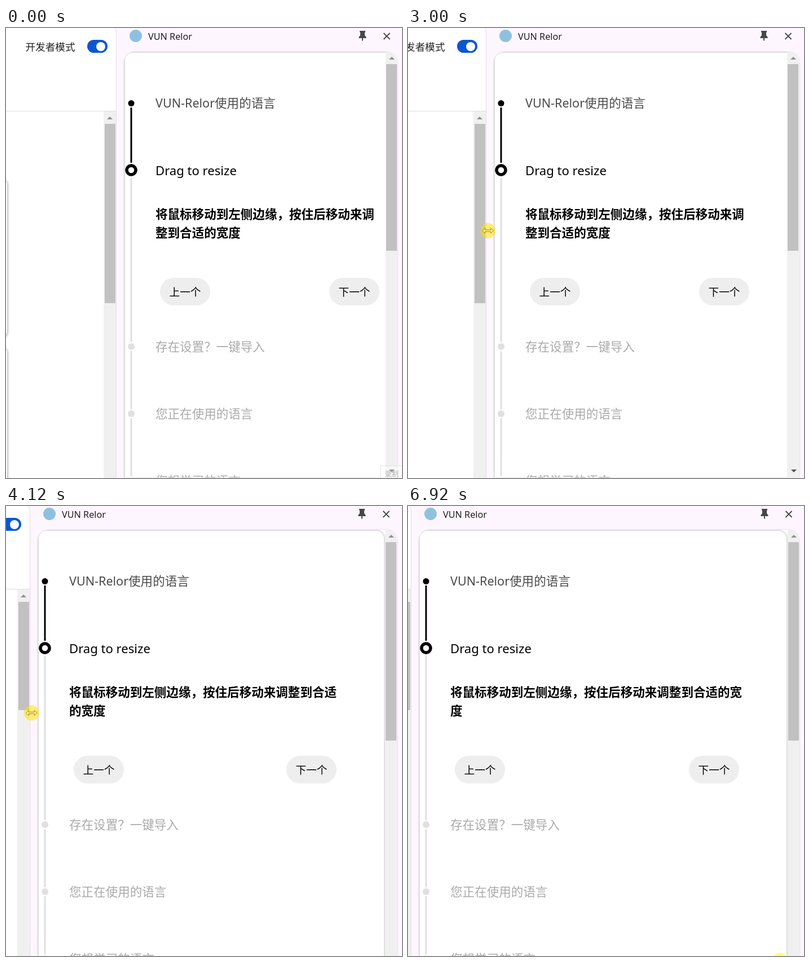
Write an HTML page that moves like this. It is 702 by 798 pixels and loops after 7.05 s.

```html
<!DOCTYPE html>
<html lang="zh-CN">
<head>
<meta charset="utf-8">
<title>Drag to resize</title>
<style>
  html, body { margin: 0; width: 100%; height: 100%; overflow: hidden; }
  body { font-family: "Noto Sans", "Noto Sans CJK SC", sans-serif; }
  #stage {
    --x: 0px; --r: 0px;
    position: relative; width: 702px; height: 798px; overflow: hidden;
    background: #fdf6fe; white-space: nowrap;
  }
  #stage div, #stage svg { position: absolute; box-sizing: border-box; }

  /* browser page on the left */
  .page {
    left: -300px; top: -3px; width: calc(496px + var(--x)); height: 810px;
    background: #fff; border-right: 1px solid #e4dde6;
    border-top-right-radius: 11px; overflow: hidden;
  }
  .mode { right: 72.5px; top: 24px; font-size: 17.6px; line-height: 24px; color: #1f1f1f; }
  .toggle { right: 15px; top: 24px; width: 36px; height: 23px; border-radius: 12px; background: #0b57d0; }
  .toggle::after {
    content: ""; position: absolute; right: 4px; top: 3.5px;
    width: 16px; height: 16px; border-radius: 50%; background: #fff;
  }
  .rule { left: 0; right: 0; top: 150px; height: 1px; background: #dcdcdc; }
  .tile {
    width: 200px; left: calc(102px + var(--x) / 4);
    border-radius: 8px; background: #fff; box-shadow: 0 1px 5px rgba(0, 0, 0, .55);
  }

  .track { background: #f0f0f0; }
  .thumb { background: #c1c1c1; width: 19px; }
  .up, .down { width: 10px; height: 5px; background: #8f8f8f; clip-path: polygon(50% 0, 100% 100%, 0 100%); }
  .down { background: #505050; clip-path: polygon(0 0, 100% 0, 50% 100%); }

  /* side panel */
  .icon { left: calc(219px + var(--x)); top: 3px; width: 22px; height: 22px; border-radius: 50%; background: #8fc1de; }
  .name { left: calc(252px + var(--x)); top: 3px; font-size: 16.2px; line-height: 24px; color: #1f1f1f; }
  .tools { left: var(--r); top: 0; }
  .panel {
    left: calc(209px + var(--x)); right: 8px; top: 42px; height: 770px;
    background: #fff; border-radius: 20px; overflow: hidden;
    box-shadow: 0 0 0 1px #ebe4ed;
  }
  .card {
    left: 2px; top: 2px; height: 800px;
    width: max(535px, calc(460px + var(--r) - var(--x)));
    border-radius: 14px; background: #fff; box-shadow: 0 0 2px 2px #d9d9d9;
  }
  .steps { left: 0; top: 0; }
  .label { left: 56px; font-size: 21.56px; line-height: 32px; color: #aaa; }
  .tip {
    left: 56px; top: 271px; width: max(404px, calc(329px + var(--r) - var(--x)));
    font-size: 21.56px; font-weight: 700; line-height: 33px; color: #000;
    white-space: normal; word-break: break-all;
  }
  .btn {
    left: 64px; top: 401px; width: 89px; height: 49px; border-radius: 25px;
    background: #eee; font-size: 18.7px; line-height: 49px; text-align: center; color: #000;
  }
  .next { left: max(364px, calc(289px + var(--r) - var(--x))); }
  .panel .track { right: 0; top: 0; width: calc(21px - var(--r)); height: 100%; }
  .panel .thumb { right: calc(1px - var(--r)); top: 22px; height: 331px; }
  .panel .up { right: calc(5px - var(--r)); top: 9px; }
  .panel .down { right: 5px; top: 741px; }
  .hbar { left: 0; right: 0; top: 755px; height: 30px; background: #e9e9e9; }
  .wide .panel .thumb { height: 352px; }
  .wide .down, .wide .hbar { display: none; }

  .rec {
    left: 663px; top: 776px; width: 45px; height: 30px; border: 1px solid #e6e3e6;
    background: rgba(255, 255, 255, .4); color: #b4b4b4;
    font-size: 12.6px; line-height: 28px; padding-left: 7px;
  }
  #cursor { left: 0; top: 0; overflow: visible; }
</style>
</head>
<body>
<div id="stage">
  <div class="page">
    <div class="tile" style="top:272px;height:278px"></div>
    <div class="tile" style="top:570px;height:290px"></div>
    <div class="mode">开发者模式</div>
    <div class="toggle"></div>
    <div class="rule"></div>
    <div class="track" style="right:0;top:151px;width:22px;height:660px"></div>
    <div class="up" style="right:6px;top:160px"></div>
    <div class="thumb" id="pageThumb" style="right:1px;top:173px"></div>
  </div>

  <div class="icon"></div>
  <div class="name">VUN Relor</div>
  <svg class="tools" width="702" height="30">
    <path d="M627 5h10v2l-1 1v5l2.500 3v2h-5.500v4l-1 1-1-1v-4h-5.500v-2l2.500-3v-5l-1-1z" fill="#474747"/>
    <path d="M669.500 9l11 11m0-11l-11 11" stroke="#474747" stroke-width="1.800"/>
  </svg>

  <div class="panel">
    <div class="card"></div>
    <svg class="steps" width="40" height="770" viewBox="0 42 40 770">
      <g stroke-width="3">
        <path d="M13 141V239" stroke="#000"/>
        <path d="M13 266V557M13 573V676M13 692V795" stroke="#e0e0e0"/>
      </g>
      <circle cx="13" cy="133.500" r="5.500"/>
      <circle cx="13" cy="252" r="8" fill="#fff" stroke="#000" stroke-width="5.500"/>
      <g fill="#e0e0e0">
        <circle cx="13" cy="565" r="6"/>
        <circle cx="13" cy="684" r="6"/>
        <circle cx="13" cy="803" r="6"/>
      </g>
    </svg>
    <div class="label" style="top:75px;color:#4a4a4a">VUN-Relor使用的语言</div>
    <div class="label" style="top:194px;color:#000;font-size:22.1px">Drag to resize</div>
    <div class="tip">将鼠标移动到左侧边缘，按住后移动来调整到合适的宽度</div>
    <div class="btn">上一个</div>
    <div class="btn next">下一个</div>
    <div class="label" style="top:507px">存在设置？一键导入</div>
    <div class="label" style="top:626px">您正在使用的语言</div>
    <div class="label" style="top:745px">您想学习的语言</div>
    <div class="hbar"></div>
    <div class="track"></div>
    <div class="up"></div>
    <div class="thumb"></div>
    <div class="down"></div>
  </div>

  <div class="rec" id="rec">录制</div>

  <svg id="cursor" width="1" height="1">
    <path id="arrow" d="M0 0V17L4 13.500 6.500 19.500 9 18.500 6.500 12.500H12Z" fill="#fff" stroke="#000"/>
    <path id="resize" d="M-10 0L-5-4.500V-1.500H5V-4.500L10 0 5 4.500V1.500H-5V4.500Z" fill="#fff" stroke="#000" stroke-width=".8"/>
    <circle id="halo" r="13.500"/>
  </svg>
</div>

<script>
const LOOP = 7050, STEP = 69.46;
const $ = id => document.getElementById(id);
const stage = $('stage');

// keys: [time, cursor x, cursor y, panel offset]
const approach = [[70, 672, 785], [415, 500, 560], [760, 297, 367], [830, 276, 363], [1190, 205, 415]];
const drag = [
  [2380, 202, 353, -1], [2580, 188, 356, -13], [3350, 105, 362, -92],
  [4120, 45, 367, -153], [4680, 18, 370, -184], [4950, 13, 370.5, -190]
];
const leave = [[5540, 22, 378], [5890, 330, 562], [6240, 617, 756], [6310, 634, 768], [6520, 640, 791], [6590, 640, 815]];

function sample(keys, time) {
  const start = keys[0][0], last = keys.length - 1;
  const step = Math.max(0, Math.floor((time - start + 10) / STEP));
  const t = Math.max(start, Math.min(time, start + step * STEP));
  if (t >= keys[last][0]) return keys[last].slice(1);
  let i = 0;
  while (t >= keys[i + 1][0]) i++;
  const a = keys[i], b = keys[i + 1], span = b[0] - a[0], u = (t - a[0]) / span;
  const slope = (k, c) => {
    const p = keys[Math.max(0, k - 1)], n = keys[Math.min(last, k + 1)];
    return (n[c] - p[c]) / (n[0] - p[0]);
  };
  return a.slice(1).map((v, j) => {
    const c = j + 1, d = b[c] - v;
    const m0 = slope(i, c) * span, m1 = slope(i + 1, c) * span;
    return v + u * (m0 + u * (3 * d - 2 * m0 - m1 + u * (m0 + m1 - 2 * d)));
  });
}

function pose(t) {
  if (t < 70) return null;
  if (t < 1920) return sample(approach, t);
  if (t < 2380) return [203, 352];
  if (t < 5540) return sample(drag, t);
  if (t < 6590) return sample(leave, t);
  return t < 6920 ? null : [659, 805.5];
}

function draw(t) {
  const off = t < 2380 ? 0 : Math.round(sample(drag, t)[2]);
  stage.style.setProperty('--x', off + 'px');
  stage.style.setProperty('--r', off < -50 && off > -190 ? '-1px' : '0px');
  stage.classList.toggle('wide', off < -75);
  $('pageThumb').style.height = (off < -120 ? 192 : 318) + 'px';
  $('rec').style.display = t < 70 ? '' : 'none';

  const p = pose(t);
  $('cursor').style.display = p ? '' : 'none';
  if (!p) return;
  const [x, y] = p, onEdge = Math.abs(x - 203 - off) < 14;
  $('cursor').style.transform = `translate(${x}px, ${y}px)`;
  $('arrow').style.display = onEdge ? 'none' : '';
  $('resize').style.display = onEdge ? '' : 'none';
  const pressed = t >= 2380 && t < 5540;
  $('halo').setAttribute('fill', pressed ? 'rgba(255,225,0,.52)' : 'rgba(255,255,0,.55)');
}

const begin = performance.now();
function tick() {
  draw((performance.now() - begin) % LOOP);
  requestAnimationFrame(tick);
}
tick();
</script>
</body>
</html>
```
